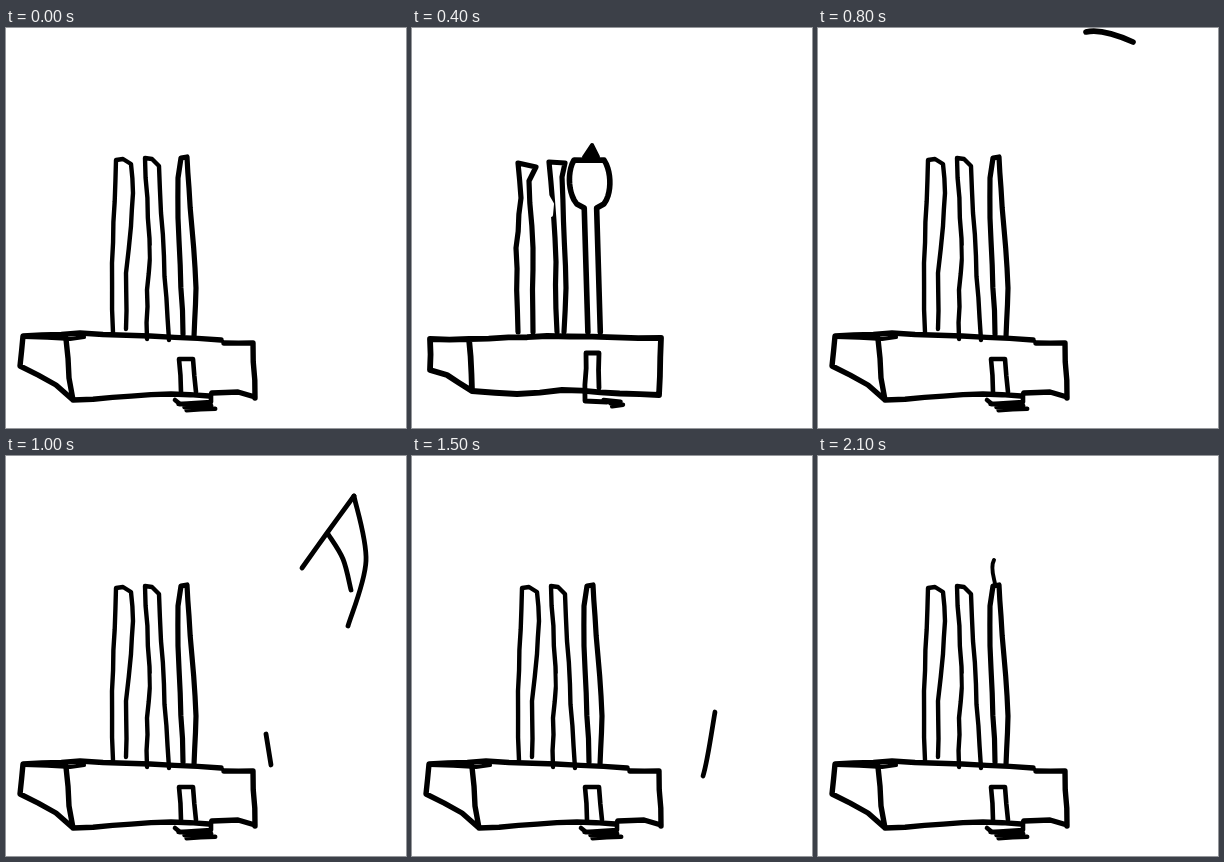
Animation of 400 by 400 pixels, one loop 2.2 s. Source, as an HTML page:

```html
<!DOCTYPE html>
<html lang="en">
<head>
<meta charset="utf-8">
<style>
  html, body { margin: 0; width: 100%; height: 100%; overflow: hidden; background: #fff; }
  svg { display: block; width: 100vw; height: 100vh; fill: none; stroke: #000; stroke-linecap: round; stroke-linejoin: round; }
</style>
</head>
<body>
<svg id="stage" viewBox="0 0 400 400"></svg>
<script>
const STEP = 100, LOOP = 2200, LAUNCH = 6, SPLIT = 10;

let seed = 7;
const random = () => (seed = seed * 16807 % 2147483647) / 2147483647;
const jitter = size => (random() - 0.5) * 2 * size;
const parse = text => text.split(' ').map(p => p.split(',').map(Number));
const stroke = (width, d, color = '#000') =>
  `<path stroke="${color}" stroke-width="${width}" d="${d}"/>`;

// Straight runs between key points, shaken a little like a hand-held pen.
function sketch(width, ...lines) {
  return stroke(width, lines.map(line => {
    const pts = typeof line === 'string' ? parse(line) : line;
    const out = [pts[0]];
    for (let i = 1; i < pts.length; i++) {
      const [x0, y0] = pts[i - 1], [x1, y1] = pts[i];
      const n = Math.ceil(Math.hypot(x1 - x0, y1 - y0) / 24);
      for (let k = 1; k < n; k++)
        out.push([x0 + (x1 - x0) * k / n + jitter(0.6), y0 + (y1 - y0) * k / n + jitter(0.6)]);
      out.push(pts[i]);
    }
    return 'M' + out.join('L');
  }).join(''));
}

// Spline piece from pts[i] to pts[i + 1].
function splinePiece(pts, i) {
  const b = pts[i], c = pts[i + 1], a = pts[i - 1] || b, e = pts[i + 2] || c;
  const handle = (p, from, to, sign) => p.map((v, k) => v + sign * (to[k] - from[k]) / 6);
  return `M${b}C${handle(b, a, c, 1)} ${handle(c, b, e, -1)} ${c}`;
}
function curve(width, points) {
  const pts = parse(points);
  return stroke(width, pts.slice(1).map((_, i) => splinePiece(pts, i)).join(''));
}

// Back-and-forth scrawl sinking from the starting height.
function scrawl(x, y, w, turns) {
  const pts = [];
  for (let i = 0; i < turns; i++)
    pts.push([x + i * 2 + (i % 2 ? w : 0) + jitter(1.5), y + i * 1.6]);
  return sketch(4.4, pts);
}

const rest =
  sketch(4.4,
    '107,304 106,235 110,132 117,131 125,136 127,165 125,198 120,245 120,301',
    '141,311 141,262 144,230 139,130 146,131 153,138 155,185 163,312') +
  stroke(2, 'M146.6 218L147 242', '#fff') +
  sketch(5.2, '177,306 172,190 172,150 175,130 181,129 183,160 190,260 188,309') +
  sketch(5.4,
    '60,311 63,350 67,372 50,357 14,338 17,308 74,305 215,312',
    '218,315 247,315 249,370',
    '67,372 165,366 203,368', '206,365 232,364 249,369') +
  sketch(4.2, '18,309 64,311 78,309') +
  sketch(4.6, '175,364 173,331 187,331 190,364', '169,372 174,376 205,374 205,366') +
  scrawl(174, 376, 28, 5);

const bodyA =
  sketch(5.2,
    '105,302 104,238 108,130 125,136 118,265 122,302',
    '143,300 145,245 138,131 154,138 152,200 155,300') +
  stroke(3, 'M143.5 177L144.5 206', '#fff') +
  sketch(5.6,
    '63,366 62,307 105,304 190,303 247,311 249,367 200,363 165,366 63,366 38,346 17,341 18,310 62,309') +
  sketch(4.8, '176,366 176,328 186,328 189,358', '172,367 173,375 205,374 206,367') +
  scrawl(185, 375, 14, 4) +
  '<circle cx="210" cy="382" r="4" stroke-width="4"/>';

const bodyB =
  sketch(5.2,
    '106,304 104,220 109,170 106,135 124,139 117,153 121,220 121,304',
    '145,304 143,210 137,134 153,135 150,149 154,260 152,304') +
  stroke(4, 'M136 169L140 176L139 187', '#fff') +
  sketch(5.8,
    '60,363 57,311 18,311 18,342 35,347 60,363 105,366 150,362 247,367 249,310 135,308 57,311') +
  sketch(4.8, '187,360 187,325 174,325 173,373 195,374') +
  scrawl(193, 372, 13, 5);

// Third tube with a round swelling that climbs and grows with each step.
function swollen(step, size = 5 + 2.25 * step) {
  const center = 241 - 22 * step, reach = 21 + 1.5 * step;
  const left = [], right = [];
  for (let y = 304; y >= 131; y -= 4) {
    const mid = 177 + (y - 131) / 34;
    const half = 6.2 + size * Math.sqrt(Math.max(0, 1 - ((y - center) / reach) ** 2));
    left.push([mid - half, y]);
    right.unshift([mid + half, y]);
  }
  return sketch(5.6, [...left, ...right]);
}

const cap = '<path fill="#000" stroke-width="4" d="M172 129L180 117L186 129Z"/>';

// Up out of the tube, over the top, down to the ground and back in; one piece per step.
const route = parse(
  '178,121 236,34 268,4 315,14 348,40 342,170 334,188 318,212 306,236 ' +
  '303,256 291,320 276,339 253,256 228,125 204,80 176,104 177,128');
const split =
  curve(4.8, '296,112 321,77 348,40') + curve(4.8, '348,40 360,105 342,170') +
  curve(4.8, '322,78 337,103 345,134') + curve(4.8, '260,278 265,309');

function scene(i) {
  if (i === 0) return rest;
  if (i < 3) return bodyA + swollen(i);
  if (i < 5) return bodyB + swollen(i) + (i === 4 ? cap : '');
  if (i < LAUNCH) return bodyB + swollen(i, 0) + curve(5.4, '179,119 184,105 193,88');
  if (i === SPLIT) return rest + split;
  const k = i - LAUNCH;
  return rest + stroke(5.9 - 0.13 * k, splinePiece(route, k));
}

const scenes = Array.from({ length: LOOP / STEP }, (_, i) => scene(i));
const stage = document.getElementById('stage');
const start = performance.now();
let shown = -1;

function draw(now) {
  const i = Math.floor(Math.max(0, now - start) % LOOP / STEP);
  if (i !== shown) stage.innerHTML = scenes[shown = i];
  requestAnimationFrame(draw);
}
draw(start);
</script>
</body>
</html>
```
